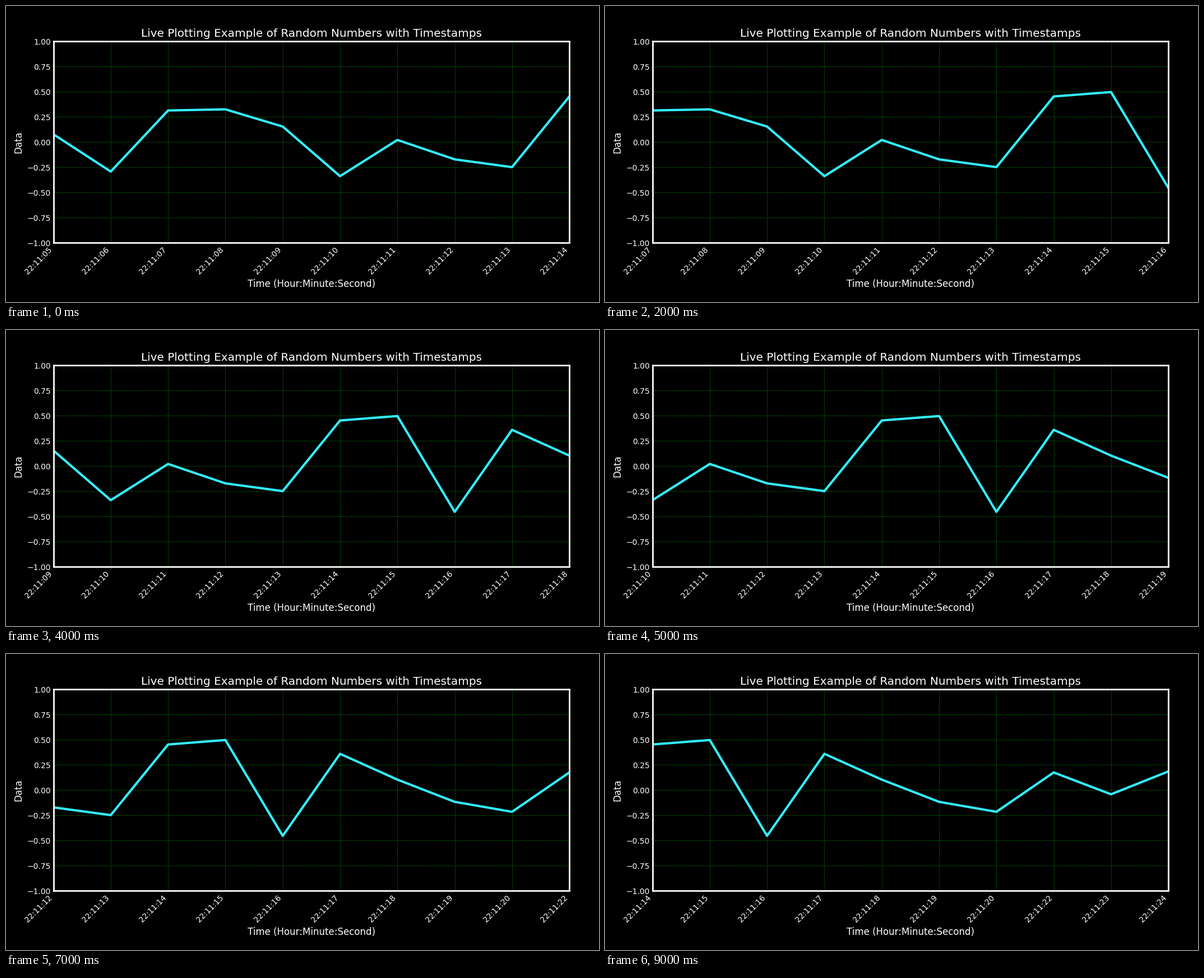
Recreate the animation shown at these times as a matplotlib script. Size 1058x529 px, loop 10000 ms.

```python
import matplotlib.pyplot as plt
from matplotlib.animation import FuncAnimation

WIDTH, HEIGHT, DPI = 1058, 529, 100
WINDOW = 10

SECONDS = [*range(5, 21), 22, 23, 24]
VALUES = [0.078, -0.292, 0.315, 0.326, 0.155, -0.338, 0.022, -0.171, -0.248,
          0.454, 0.498, -0.454, 0.361, 0.105, -0.116, -0.215, 0.176, -0.041,
          0.186]

plt.rcParams.update({
    "font.family": "DejaVu Sans",
    "font.size": 10,
    "text.color": "white",
    "axes.labelcolor": "white",
    "axes.edgecolor": "white",
    "axes.linewidth": 2,
    "axes.titlesize": "x-large",
    "axes.labelsize": "large",
    "xtick.color": "white",
    "ytick.color": "white",
})

fig = plt.figure(figsize=(WIDTH / DPI, HEIGHT / DPI), dpi=DPI, facecolor="black")
fig.subplots_adjust(left=0.08, right=0.95, bottom=0.2, top=0.88)
ax = fig.add_subplot(facecolor="black")
ax.set(xlim=(0, WINDOW - 1), ylim=(-1, 1), xticks=range(WINDOW),
       xlabel="Time (Hour:Minute:Second)", ylabel="Data")
ax.set_title("Live Plotting Example of Random Numbers with Timestamps")
ax.tick_params(length=0, pad=3.5)
ax.grid(color="green", linestyle="--", linewidth=0.5)
ax.set_axisbelow(True)

line, = ax.plot([], [], color="#33eeff", linewidth=3)


def update(step):
    """Show the ten samples that start at the given step."""
    shown = slice(step, step + WINDOW)
    line.set_data(range(WINDOW), VALUES[shown])
    labels = [f"22:11:{second:02d}" for second in SECONDS[shown]]
    ax.set_xticklabels(labels, rotation=45, ha="right")
    return line,


animation = FuncAnimation(fig, update, frames=10, interval=1000,
                          repeat=True, repeat_delay=0, blit=False)
plt.show()
```
